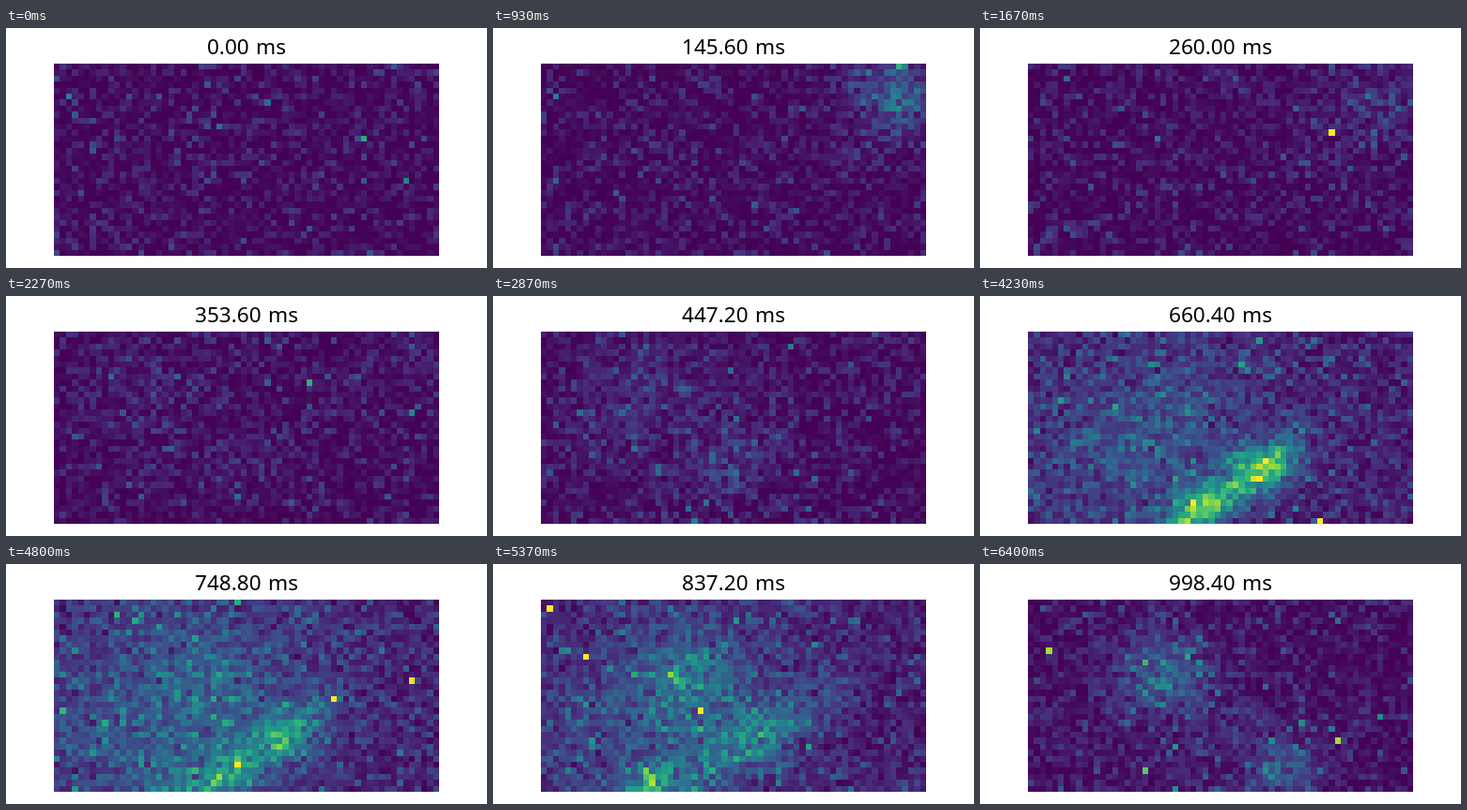
An HTML page with a canvas that plays this animation: 512x256 px, repeating every 6430 ms.

```html
<!DOCTYPE html>
<html lang="en">
<head>
<meta charset="utf-8">
<title>Activity map</title>
<style>
  html, body { margin: 0; width: 100%; height: 100%; overflow: hidden; background: #fff; }
  svg, canvas { position: absolute; left: 0; top: 0; }
  canvas { left: 51px; top: 38px; width: 410px; height: 205px; image-rendering: pixelated; }
  text { font: 500 22.6px "Noto Sans", "Open Sans", sans-serif; word-spacing: 1.5px; text-anchor: middle; }
</style>
</head>
<body>
<svg width="512" height="256"><text id="label" x="256" y="28">0.00 ms</text></svg>
<canvas id="map" width="64" height="32"></canvas>
<script>
const W = 64, H = 32, STEPS = 193, LOOP = 6430, STEP_MS = 5.2;
const DECAY = 0.55, WARM_UP = 12, TILT = -0.55;

const bell = (v, mid, width) => Math.exp(-(((v - mid) / width) ** 2) / 2);

// A soft glow that swells and fades around one step; larger ones last longer
function wave(at, x, y, long, wide, peak) {
  const cos = Math.cos(TILT), sin = Math.sin(TILT);
  const shape = Float32Array.from({ length: W * H }, (_, i) => {
    const dx = i % W - x, dy = Math.floor(i / W) - y;
    return peak * bell(dx * cos + dy * sin, 0, long) * bell(dy * cos - dx * sin, 0, wide);
  });
  return { shape, strength: n => bell(n, at, 8 + long) };
}

const waves = [
  wave(28, 59, 5, 4, 4, 0.25),
  wave(45, 55, 7, 9, 6, 0.05),
  wave(86, 16, 9, 9, 7, 0.08),
  wave(86, 31, 21, 6, 4, 0.11),
  wave(127, 28, 29, 4.5, 2.4, 0.6),
  wave(127, 39, 22, 4.5, 2.4, 0.6),
  wave(143, 19, 19, 16, 13, 0.2),
  wave(161, 25, 13, 6, 6, 0.18),
  wave(161, 36, 22, 8, 3, 0.28),
  wave(161, 18, 31, 4, 3, 0.35),
  wave(192, 22, 12, 5, 5, 0.23),
  wave(192, 42, 28, 6, 3, 0.22)
];
const baseLevel = n => 0.043 + 0.065 * bell(n, 142, 22);

// Brightest single-cell flashes
const flashes = [
  { at: 0, x: 51, y: 12, level: 0.6 },
  { at: 50, x: 50, y: 11, level: 1 },
  { at: 127, x: 48, y: 31, level: 1 },
  { at: 161, x: 1, y: 1, level: 1 },
  { at: 161, x: 7, y: 9, level: 1 },
  { at: 192, x: 19, y: 28, level: 0.75 }
];

let seed = 20417;
function random() {
  seed = (seed + 0x6d2b79f5) | 0;
  let r = Math.imul(seed ^ (seed >>> 15), 1 | seed);
  r = (r + Math.imul(r ^ (r >>> 7), 61 | r)) ^ r;
  return ((r ^ (r >>> 14)) >>> 0) / 4294967296;
}

function poisson(mean) {
  const limit = Math.exp(-mean);
  let count = 0;
  for (let p = random(); p > limit; p *= random()) count++;
  return count;
}

function meanActivity(n) {
  const mean = new Float32Array(W * H).fill(baseLevel(n));
  for (const { shape, strength } of waves) {
    const s = strength(n);
    if (s > 0.01) shape.forEach((v, i) => mean[i] += v * s);
  }
  return mean;
}

// Leaky sum of random spikes; a few restless cells also fire in strong bursts
function simulate() {
  const restless = Array.from({ length: 30 }, () => Math.floor(random() * W * H));
  const level = new Float32Array(W * H);
  const frames = [];
  for (let n = -WARM_UP; n < STEPS; n++) {
    meanActivity(n).forEach((mean, i) => {
      const quantum = 0.1 / (1 + 5 * mean);
      const spikes = poisson(mean * (1 - DECAY) / quantum);
      level[i] = level[i] * DECAY + spikes * quantum * (0.6 + 0.8 * random());
    });
    for (const i of restless) {
      if (random() < 0.08) level[i] += 0.2 + 0.6 * random() ** 2;
    }
    for (const f of flashes) {
      if (f.at === n) level[f.y * W + f.x] = f.level;
    }
    if (n >= 0) frames.push(level.slice());
  }
  return frames;
}

const palette = ["440154", "472d7b", "3b528b", "2c728e", "21918c", "28ae80", "5ec962", "addc30", "fde725"]
  .map(hex => [0, 2, 4].map(i => parseInt(hex.slice(i, i + 2), 16)));

const frames = simulate();
const label = document.getElementById("label");
const ctx = document.getElementById("map").getContext("2d");
const image = ctx.createImageData(W, H);
image.data.fill(255);

function draw(n) {
  frames[n].forEach((value, i) => {
    const pos = Math.min(value, 1) * (palette.length - 1);
    const low = Math.min(Math.floor(pos), palette.length - 2);
    for (let c = 0; c < 3; c++) {
      const a = palette[low][c], b = palette[low + 1][c];
      image.data[i * 4 + c] = a + (b - a) * (pos - low);
    }
  });
  ctx.putImageData(image, 0, 0);
  label.textContent = (n * STEP_MS).toFixed(2) + " ms";
}

// Three steps per 100 ms, starting at 0, 30 and 70
function stepAt(ms) {
  const rest = ms % 100;
  return Math.floor(ms / 100) * 3 + (rest >= 70 ? 2 : rest >= 30 ? 1 : 0);
}

const start = performance.now();
let shown = -1;
function tick() {
  const n = Math.min(stepAt((performance.now() - start) % LOOP), STEPS - 1);
  if (n !== shown) draw(shown = n);
  requestAnimationFrame(tick);
}
tick();
</script>
</body>
</html>
```
